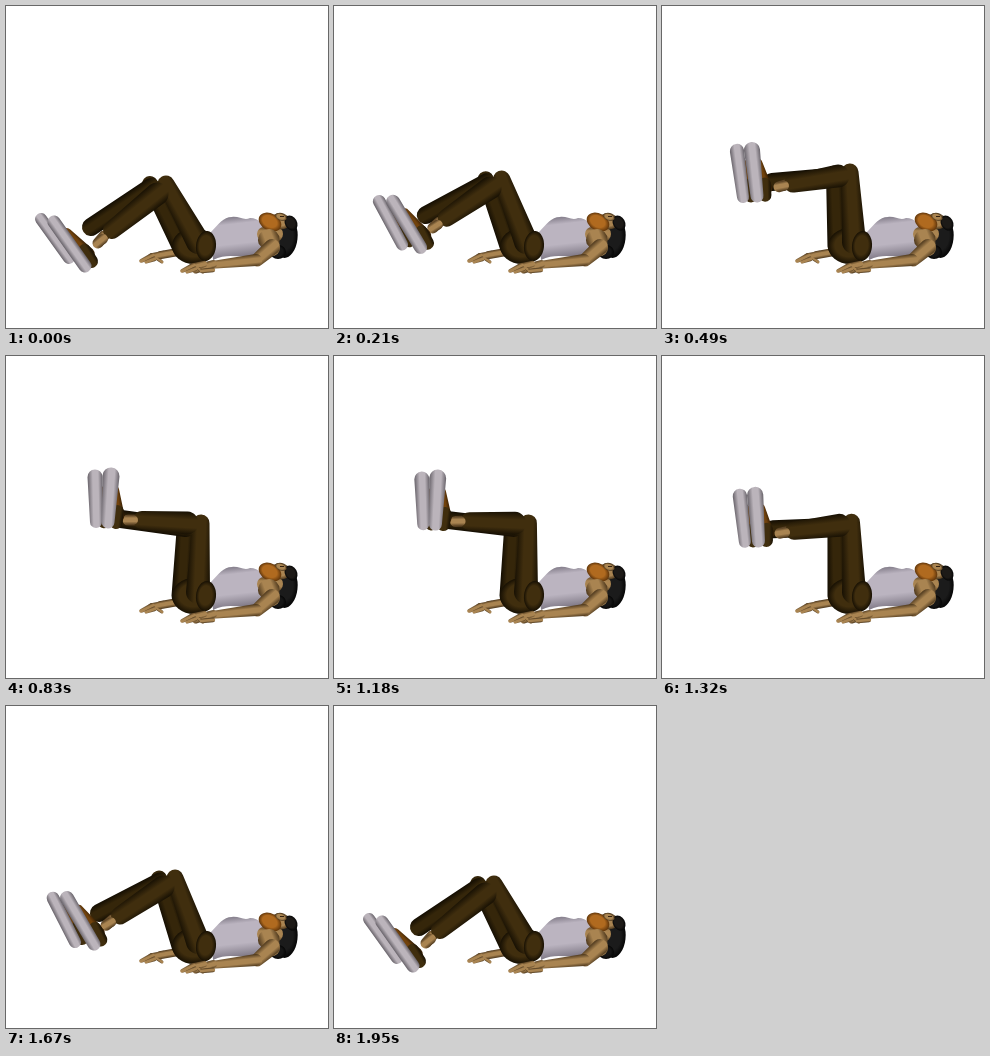
An HTML page with a canvas that plays this animation: 322x322 px, repeating every 2150 ms.

```html
<!DOCTYPE html>
<html>
<head>
<meta charset="utf-8">
<style>
html, body { margin: 0; width: 100%; height: 100%; overflow: hidden; background: #fff; }
canvas { display: block; width: 100vw; height: 100vh; }
</style>
</head>
<body>
<canvas id="stage" width="322" height="322"></canvas>
<script>
const ctx = document.getElementById('stage').getContext('2d');
const LOOP = 2150;

// [edge, middle] tones
const PANTS = ['#171003', '#402e0e'];
const PANTS_FAR = ['#130d02', '#35260a'];
const SKIN = ['#4c371c', '#a98451'];
const SOLE = ['#68636a', '#bbb4bb'];
const SHIRT = ['#77717e', '#bbb4c0'];
const SHOE = ['#2a1803', '#71420c'];

// Lift amount, then knee, calf top, cuff, near toe, near heel, far toe, far heel
const POSES = [
  [0,    160,178, 151,188, 98,230,  48,216, 79,260,  35,213, 63,252],
  [.242, 169,172, 157,181, 106,214, 61,192, 88,238,  47,192, 69,236],
  [.463, 179,168, 166,177, 116,199, 73,171, 90,218,  60,171, 72,216],
  [.758, 188,166, 176,170, 123,179, 90,144, 95,190,  75,145, 81,191],
  [1,    195,167, 181,167, 128,164, 105,120, 102,166, 89,121, 90,166]
];

const mix = (a, b, k) => a + (b - a) * k;
const smooth = u => {
  u = Math.min(1, Math.max(0, u));
  return u * u * (3 - 2 * u);
};

// The picture advances in held steps
function heldTime(t) {
  if (t < 770) return Math.floor(t / 70) * 70;
  if (t < 830) return 700;
  if (t < 1080) return 830;
  if (t < 1250) return t < 1150 ? 1080 : 1150;
  return Math.min(1950, 1250 + Math.floor((t - 1250) / 70) * 70);
}

function liftAt(t) {
  t = heldTime(t);
  return t < 1080 ? smooth(t / 721) : 1 - smooth((t - 1075) / 875);
}

function poseAt(p) {
  let i = 0;
  while (i < POSES.length - 2 && p > POSES[i + 1][0]) i++;
  const a = POSES[i], b = POSES[i + 1];
  const k = (p - a[0]) / (b[0] - a[0]);
  const pts = [];
  for (let j = 1; j < a.length; j += 2)
    pts.push([mix(a[j], b[j], k), mix(a[j + 1], b[j + 1], k)]);
  return pts;
}

// Tapered capsule shaded across its width
function limb([x1, y1], r1, [x2, y2], r2, [edge, mid]) {
  const a = Math.atan2(y2 - y1, x2 - x1), q = Math.PI / 2;
  const r = Math.max(r1, r2);
  const mx = (x1 + x2) / 2, my = (y1 + y2) / 2;
  const nx = -Math.sin(a) * r, ny = Math.cos(a) * r;
  const g = ctx.createLinearGradient(mx - nx, my - ny, mx + nx, my + ny);
  g.addColorStop(0, edge);
  g.addColorStop(.3, mid);
  g.addColorStop(.65, mid);
  g.addColorStop(1, edge);
  ctx.beginPath();
  ctx.arc(x1, y1, r1, a + q, a + 3 * q);
  ctx.arc(x2, y2, r2, a - q, a + q);
  ctx.closePath();
  ctx.fillStyle = g;
  ctx.fill();
}

function ball(x, y, rx, ry, [edge, mid], turn = 0) {
  ctx.save();
  ctx.translate(x, y);
  ctx.rotate(turn);
  ctx.scale(rx, ry);
  const g = ctx.createRadialGradient(-.1, -.1, .2, 0, 0, 1);
  g.addColorStop(0, mid);
  g.addColorStop(.55, mid);
  g.addColorStop(1, edge);
  ctx.beginPath();
  ctx.arc(0, 0, 1, 0, 7);
  ctx.fillStyle = g;
  ctx.fill();
  ctx.restore();
}

function hand(x, y) {
  limb([x + 24, y - 6], 3.2, [x + 13, y - 3], 4, SKIN);
  limb([x + 13, y - 4], 3, [x + 2, y + 1], 1.8, SKIN);
  limb([x + 15, y - 1], 2.5, [x + 7, y + 2], 1.6, SKIN);
  limb([x + 19, y - 1], 2, [x + 23, y + 2], 1.5, SKIN);
}

function torso() {
  ctx.beginPath();
  ctx.moveTo(205, 226);
  ctx.bezierCurveTo(213, 218, 217, 211, 226, 211);
  ctx.bezierCurveTo(233, 210, 238, 215, 244, 212);
  ctx.bezierCurveTo(253, 212, 259, 219, 263, 228);
  ctx.bezierCurveTo(264, 240, 255, 248, 245, 250);
  ctx.bezierCurveTo(232, 252, 221, 247, 207, 254);
  ctx.closePath();
  const g = ctx.createLinearGradient(228, 209, 233, 253);
  g.addColorStop(0, SHIRT[0]);
  g.addColorStop(.2, SHIRT[1]);
  g.addColorStop(.65, SHIRT[1]);
  g.addColorStop(1, SHIRT[0]);
  ctx.fillStyle = g;
  ctx.fill();
}

function head() {
  ball(280, 232, 11.5, 20, ['#050505', '#1b1b1b'], .12);
  ball(272, 246, 8, 7, ['#050505', '#161616']);
  limb([258, 228], 7, [269, 228], 8, SKIN);
  ball(275, 215, 9.5, 8, SKIN, .4);
  ball(285, 217, 6, 8, ['#050505', '#1d1a17'], -.5);
  ball(264, 216, 12, 8.5, ['#60350a', '#b06a1f'], .5);
  ball(275, 211, 6, 3.5, SKIN, .35);
  ctx.fillStyle = '#33200e';
  ctx.fillRect(274, 210, 4, 1);
}

function nearArm() {
  limb([263, 234], 11, [266, 242], 8, SKIN);
  limb([266, 241], 8, [251, 254], 6.5, SKIN);
  limb([250, 254], 6, [205, 259], 3.8, SKIN);
  limb([207, 258], 4, [190, 263], 4.5, SKIN);
  hand(174, 264);
  limb([196, 265], 2.2, [207, 264], 2.2, SKIN);
}

function upper(toe, heel) {
  const dx = heel[0] - toe[0], dy = heel[1] - toe[1], len = Math.hypot(dx, dy);
  const at = (k, n) => [toe[0] + dx * k + dy / len * n, toe[1] + dy * k - dx / len * n];
  limb(at(.3, 4), 5, at(.85, 8), 8, SHOE);
  limb(at(.75, 9), 6, at(1, 8), 6.5, PANTS);
}

function draw(p) {
  const [knee, calf, cuff, toe, heel, farToe, farHeel] = poseAt(p);
  const farKnee = [knee[0] - 16, knee[1] + mix(0, 2, p)];
  const farCuff = [cuff[0] - 13, cuff[1] - mix(9, 1, p)];
  const ankle = [cuff[0] - 6, cuff[1] + mix(7, 0, p)];

  ctx.fillStyle = '#fff';
  ctx.fillRect(0, 0, 322, 322);

  hand(133, 254);
  limb([155, 249], 4, [172, 246], 4, SKIN);
  limb(farKnee, 8, [175, 240], 9.5, PANTS_FAR);
  ball(188, 240, 22, 18, PANTS);
  limb(knee, 8.5, [192, 236], 12, PANTS);
  torso();
  ball(200, 240, 10, 15, PANTS, .1);
  head();
  nearArm();

  limb([farKnee[0] + 1, farKnee[1] + 3], 9, farCuff, 9, PANTS_FAR);
  upper(farToe, farHeel);
  limb(ankle, 5.5, cuff, 5.5, SKIN);
  limb(calf, 11.5, [cuff[0] + 8, cuff[1] - mix(6, 0, p)], 9, PANTS);
  upper(toe, heel);
  limb(ankle, 4.5, [cuff[0] - 1, cuff[1] + mix(3, 0, p)], 5, SKIN);
  limb(farToe, mix(6, 7.5, p), farHeel, 6, SOLE);
  limb(toe, mix(6.5, 8.5, p), heel, 6.5, SOLE);
}

function tick() {
  draw(liftAt(performance.now() % LOOP));
  requestAnimationFrame(tick);
}
tick();
</script>
</body>
</html>
```
